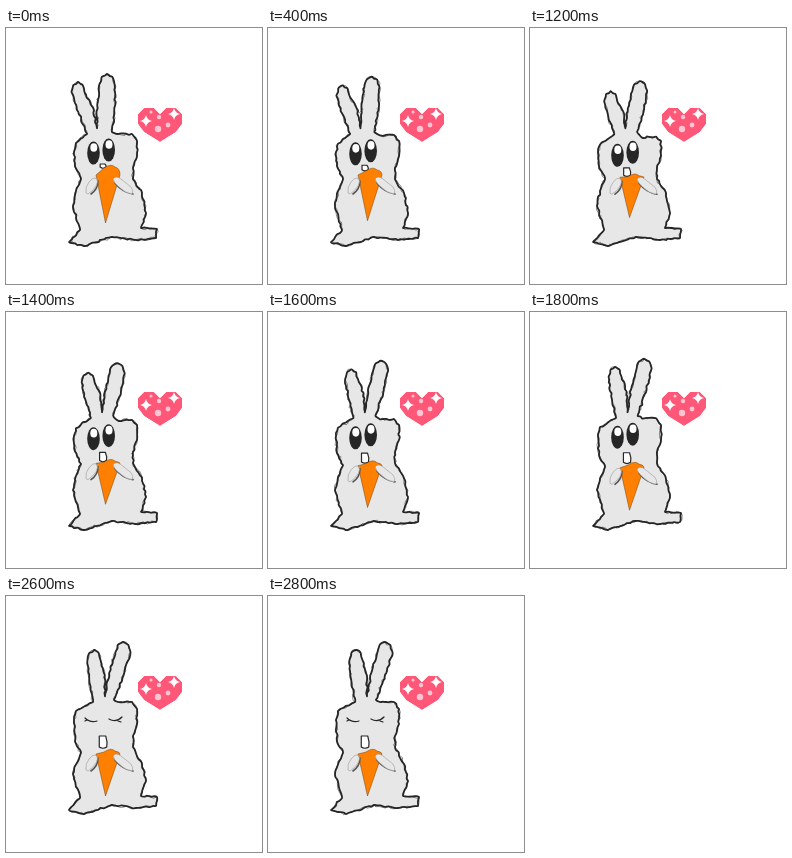
An HTML page that plays this animation: 256 px wide and 256 px high, repeating every 3000 ms.

```html
<!DOCTYPE html>
<html lang="en">
<head>
<meta charset="utf-8">
<title>Rabbit with a carrot</title>
<style>
html, body { margin: 0; width: 100%; height: 100%; overflow: hidden; background: #fff; }
svg { display: block; width: 100%; height: 100%; }
.line { stroke: #262626; stroke-linejoin: round; stroke-linecap: round; }
</style>
</head>
<body>
<svg viewBox="0 0 256 256">
  <defs>
    <filter id="soft" x="-30%" y="-30%" width="160%" height="160%"><feGaussianBlur stdDeviation=".5"/></filter>
    <path id="spark" d="M0-6Q1-1 6 0Q1 1 0 6Q-1 1-6 0Q-1-1 0-6Z" fill="#fff"/>
    <path id="heart" d="M154 86L148 80H138L132 86V96L138 104L154 114L170 104L176 96V86L170 80H160Z"/>
    <clipPath id="heartClip"><use href="#heart"/></clipPath>
  </defs>
  <g clip-path="url(#heartClip)">
    <use href="#heart" fill="#ff5778"/>
    <g fill="#ffc6d2">
      <circle cx="152" cy="101" r="3.2"/><circle cx="153" cy="89" r="2.2"/>
      <circle cx="162" cy="97" r="2.4"/><circle cx="145" cy="84" r="1.5"/>
    </g>
    <use href="#spark" x="140" y="93"/>
    <use href="#spark" x="168" y="86"/>
  </g>
  <path id="body" class="line" fill="#e7e7e7" stroke-width="1.8"/>
  <path id="sketch" class="line" fill="none" stroke-width=".9" opacity=".6"/>
  <g id="open" filter="url(#soft)"></g>
  <path id="closed" class="line" fill="none" stroke-width="1.2"/>
  <path id="mouth" class="line" fill="#fff" stroke-width="1.2"/>
  <path id="carrot" fill="#ff7f00" stroke="#70400f" stroke-width=".5" stroke-linejoin="round"/>
  <g id="arms" fill="#e7e7e7">
    <g fill="none" stroke="#555" stroke-width="1.6" stroke-linecap="round" filter="url(#soft)">
      <path d="M92 153Q92 161 85 166"/>
      <path d="M109 155Q116 164 127 166"/>
    </g>
    <path d="M80 165Q79 159 83 154Q87 149 90 150Q93 153 90 158Q87 163 82 166Z" stroke="#888" stroke-width=".5"/>
    <path d="M107 151Q110 147 115 151L125 159Q128 163 126 166Q119 165 113 159Q108 155 107 151Z" stroke="#888" stroke-width=".5"/>
  </g>
</svg>
<script>
const LOOP = 3000, STEP = 200, EYES_CLOSE = 10;
const $ = id => document.getElementById(id);
const set = (id, name, value) => $(id).setAttribute(name, value);
const clamp = v => Math.min(1, Math.max(0, v));
const ease = v => (v = clamp(v)) * v * (3 - 2 * v);

function poseAt(step) {
  const lean = clamp(step / 11);
  const dip = Math.sin(Math.PI * clamp(step / 10)) ** 2;
  return {
    lean, dip,
    drop: 9 * ease((step - 5.5) / 5.5),
    top: 138 + 16 * lean,
    side: 147 + 11 * ease((step - 4) / 7),
    tip: 195 - 9 * dip + 5 * lean,
    mouth: 138 + 8 * clamp(step / 8),
    gape: 4 + 8 * lean
  };
}

function random(seed) {
  let s = seed * 7919 + 13;
  return () => (s = (s * 16807) % 2147483647) / 2147483647 - .5;
}

function smooth(pts) {
  const n = pts.length, at = i => pts[(i + n) % n];
  let d = `M${at(0)}`;
  for (let i = 0; i < n; i++) {
    const [a, b, c, e] = [at(i - 1), at(i), at(i + 1), at(i + 2)];
    d += `C${[0, 1].map(j => b[j] + (c[j] - a[j]) / 8)} ${[0, 1].map(j => c[j] - (e[j] - b[j]) / 8)} ${c}`;
  }
  return d + 'Z';
}

// Splits an outline into short pieces that wobble like a pencil line.
function rough(pts, rnd, amount) {
  const out = [];
  pts.forEach((p, i) => {
    const q = pts[(i + 1) % pts.length];
    const n = Math.max(1, Math.round(Math.hypot(q[0] - p[0], q[1] - p[1]) / 3));
    for (let k = 0; k < n; k++)
      out.push([0, 1].map(j => p[j] + (q[j] - p[j]) * k / n + (k ? rnd() * amount : 0)));
  });
  return smooth(out);
}

// Left root, rounded tip, right root.
function ear(from, to, x, y, r) {
  const pts = [from, [(from[0] + x - r) / 2 - 1, (from[1] + y) / 2 + 4]];
  for (let a = 0; a <= 4; a++)
    pts.push([x - r * Math.cos(a * Math.PI / 4), y + 10 - 10 * Math.sin(a * Math.PI / 4)]);
  return [...pts, [(to[0] + x + r) / 2 + 2, (to[1] + y) / 2 + 2], to];
}

function outline({ lean, dip, drop }) {
  const cleft = [91 + 8 * lean, 100], slide = 16 * lean;
  return [
    ...ear([81 + 6 * lean, 106], cleft, 72 + slide, 54 + 10 * dip, 6.5),
    ...ear(cleft, [106 + 2 * lean, 104], 101 + slide, 46 + 8 * dip, 7.5),
    [112, 106 + 4 * dip], [126, 106 + 3 * dip], [131, 113], [131, 128], [127, 140], [127, 151],
    [136, 165 + drop / 3], [140, 185], [135, 200],
    [151, 201], [150, 210], [130, 212], [106, 209], [78, 218], [63, 214], [74, 202],
    [67, 178], [70, 163 + drop * .6], [75, 151 + drop * .6], [69, 138 + drop * .8],
    [68, 124], [70, 115 + 2 * dip]
  ];
}

const eye = (x, y) =>
  `<ellipse cx="${x}" cy="${y}" rx="6.3" ry="11.5" fill="#262626"/>
   <ellipse cx="${x + .3}" cy="${y - 5.5}" rx="3.5" ry="4.3" fill="#fff"/>`;

function draw(step) {
  const p = poseAt(step), rnd = random(step + 1), pts = outline(p);
  set('body', 'd', rough(pts, rnd, 1.5));
  set('sketch', 'd', rough(pts, rnd, 3));

  const awake = step < EYES_CLOSE, y = 125 + 2.5 * p.dip;
  $('open').innerHTML = awake ? eye(87.5, y) + eye(102.7, y - 3) : '';
  set('closed', 'd', awake ? '' : 'M79 122Q84 127 91 125M81 124l-2 1M103 123Q110 127 116 121M112 125l3 1');

  const m = p.mouth, h = p.gape / 2, w = 2.4 + p.gape / 9;
  set('mouth', 'd', `M${97 - w} ${m - h}H${96 + w}Q${98 + w} ${m} ${97 + w} ${m + h - 1}Q97 ${m + h + 1.5} ${97 - w} ${m + h - 1}Z`);

  const { top, side, tip } = p;
  set('carrot', 'd', `M90 ${side}L98 ${top + 2}Q105 ${top - 3} 109 ${top + 1}Q114 ${top + 2} 114 ${side}L99.5 ${tip}Z`);
  set('arms', 'transform', `translate(0 ${p.drop})`);
}

let shown = -1;
function tick() {
  const step = Math.floor((performance.now() % LOOP) / STEP);
  if (step !== shown) draw(shown = step);
  requestAnimationFrame(tick);
}
tick();
</script>
</body>
</html>
```
